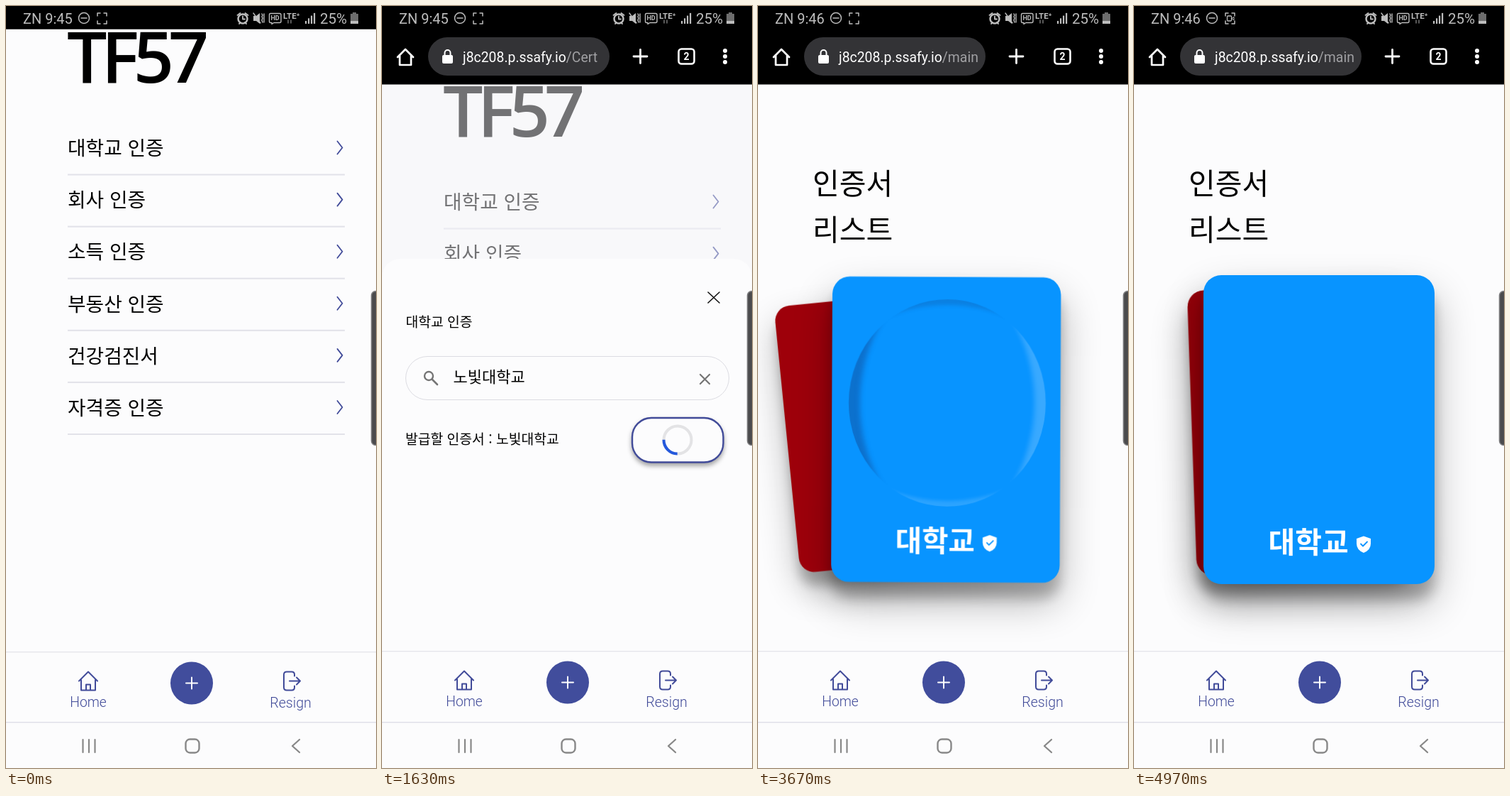
Animation, 522 px wide and 1073 px high, one loop 5000 ms. Source, as an HTML page:

```html
<!DOCTYPE html>
<html lang="ko">
<head>
<meta charset="utf-8">
<style>
html, body { margin: 0; width: 100%; height: 100%; overflow: hidden; background: #fcfcfd; }
#stage { position: absolute; left: 0; top: 0; width: 522px; height: 1073px; overflow: hidden; }
svg.layer { position: absolute; left: 0; top: 0; }
text { font-family: Roboto, "Noto Sans CJK KR", "Noto Sans CJK", sans-serif; white-space: pre; }
.ko { font-family: "Noto Sans CJK KR", "Noto Sans CJK", sans-serif; }
.logo { font: 600 100px "Open Sans", "Noto Sans", sans-serif; font-stretch: 75%; letter-spacing: -8px; }
.line { fill: none; stroke-linecap: round; stroke-linejoin: round; }
#button { filter: drop-shadow(0 4px 3px rgba(0,0,0,.35)); }
#cards { position: absolute; left: 0; top: 110px; width: 522px; height: 798px; overflow: hidden; }
#deck { position: absolute; left: 98px; top: 269px; width: 326px; height: 435px; perspective: 1200px; }
.card { position: absolute; inset: 0; border-radius: 25px; transform-origin: center bottom;
  box-shadow: 0 28px 55px rgba(0,0,0,.3), 0 22px 17px rgba(0,0,0,.22); }
.card svg, .shade { position: absolute; inset: 0; border-radius: 25px; }
.shade { background: #000; }
#ring { position: absolute; left: 24px; top: 32px; width: 281px; height: 295px; border-radius: 50%;
  box-shadow: inset 100px 0 8px -84px rgba(20,60,130,.4), inset -100px 0 8px -84px rgba(255,255,255,.2),
    inset 0 100px 5px -92px rgba(20,70,140,.25), inset 0 -100px 5px -92px rgba(255,255,255,.15); }
</style>
</head>
<body>
<div id="stage">
  <svg class="layer" id="pages" width="522" height="1073"></svg>
  <div id="cards"><div id="deck"></div></div>
  <svg class="layer" id="system" width="522" height="1073"></svg>
</div>
<script>
const $ = id => document.getElementById(id);
const INDIGO = '#414b99', PAPER = '#fcfcfd';
const SCHOOL = '노빛대학교';

// Text is placed by the vertical centre of its capitals or syllables.
const text = (x, cy, size, str, attrs = '') =>
  `<text x="${x}" y="${cy + size * .36}" font-size="${size}" ${attrs}>${str}</text>`;
const ko = (x, cy, size, str, attrs = '') => text(x, cy + size * .025, size, str, 'class="ko" ' + attrs);
const rect = (x, y, w, h, fill, r = 0, attrs = '') =>
  `<rect x="${x}" y="${y}" width="${w}" height="${h}" rx="${r}" fill="${fill}" ${attrs}/>`;
const line = (d, color, width = 2, attrs = '') =>
  `<path class="line" d="${d}" stroke="${color}" stroke-width="${width}" ${attrs}/>`;
const circle = (x, y, r, fill, attrs = '') => `<circle cx="${x}" cy="${y}" r="${r}" fill="${fill}" ${attrs}/>`;
const MID = 'text-anchor="middle" ';

function listPage() {
  const items = ['대학교 인증', '회사 인증', '소득 인증', '부동산 인증', '건강검진서', '자격증 인증'];
  return `<text class="logo" x="86" y="108">TF57</text>` + items.map((label, i) => {
    const y = 199.5 + i * 73.1;
    return ko(87, y, 27.8, label) + line(`M467.5 ${y - 9}l7 9l-7 9`, INDIGO, 1.8) +
      rect(87, y + 37, 391, 2, '#e2e2e9');
  }).join('');
}

function sheet() {
  return rect(0, 356, 522, 900, PAPER, 26) +
    line('M460 403l16 15M476 403l-16 15', '#111', 1.6) +
    ko(33.5, 445, 19.3, '대학교 인증') +
    rect(33.5, 493.5, 456, 61, PAPER, 30.5, 'id="field" stroke="#dcdce2"') +
    circle(66, 521, 6, 'none', 'stroke="#757575" stroke-width="2.4"') + line('M71 526l7 7', '#757575', 2.6) +
    ko(100.5, 522, 22, '', 'id="query"') + rect(0, 533, 0, 1.3, '#111', 0, 'id="underline"') +
    rect(0, 511, 1.6, 24, '#111', 0, 'id="caret"') +
    line('M449 519l13 13M462 519l-13 13', '#757575', 2.2) +
    ko(33, 610, 19.3, '', 'id="chosen"') +
    rect(353, 580, 128.5, 62.5, PAPER, 27, `id="button" stroke="${INDIGO}" stroke-width="2.4"`) +
    ko(417.5, 609, 22, '요청', MID + `id="request" font-weight="700" fill="${INDIGO}"`) +
    `<g id="spinner">${circle(417, 611, 19.5, 'none', 'stroke="#e3e3e5" stroke-width="4"')}
      <path d="M397.5 611A19.5 19.5 0 0 0 417 630.5" fill="none" stroke="#2458dc" stroke-width="4"/></g>` +
    `<g id="done" fill="${INDIGO}">${ko(261, 777, 27.7, '인증서가 발급되었습니다.', MID)}
      ${ko(261, 814, 27.7, '메인에서 확인하세요!', MID)}</g>`;
}

$('pages').innerHTML = rect(0, 0, 522, 1073, PAPER) +
  `<g id="flow"><g id="list">${listPage()}</g>
   ${rect(0, 0, 522, 1073, 'rgba(242,242,247,.47)', 0, 'id="veil"')}
   <g id="sheet">${sheet()}</g></g>
   <g id="main">${ko(77, 249, 41, '인증서')}${ko(77, 314, 41, '리스트')}</g>`;

function keyboard() {
  const ink = '#252525', soft = '#5d5d60', pitch = 50.75;
  const key = (x, y, w, h, label = '', hint = '', fill = '#f9f9fb', size = 25) =>
    rect(x, y, w, h, fill, 6) + ko(x + w / 2, y + h / 2 + (hint ? 5 : 0), size, label, MID + `fill="${ink}"`) +
    ko(x + 30, y + 11, 10, hint, MID + 'fill="#999"');
  const row = (x, y, h, labels, hints = '') =>
    [...labels].map((c, i) => key(x + i * pitch, y, 41, h, c, hints[i])).join('');
  const special = '#cdcdd2';
  return rect(0, 526, 522, 547, '#dcdce1') + rect(0, 526, 522, 65, '#eef1f2') +
    rect(0, 525, 522, 1.5, '#d5d8da') + rect(55, 526, 1.2, 65, '#cbced0') +
    circle(20, 559, 6, 'none', 'stroke="#222" stroke-width="3.5"') + circle(20, 559, 1.8, '#222') +
    line('M27 557h15v4h-3v4h-5v-4h-7', '#222', 2.5) +
    line('M30 619a12 12 0 0 0-5 18M40 641a12 12 0 0 0 5-18M25 637l-4-1M45 623l4 1', soft, 2.5) +
    text(35, 630, 16, 'T', MID + `fill="${soft}" font-weight="700"`) + rect(64, 617, 1.2, 26, '#b9b9be') +
    circle(105, 630, 12.5, soft) + circle(100.5, 626, 1.8, '#eee') + circle(109.5, 626, 1.8, '#eee') +
    `<path d="M98 631h14a7 7 0 0 1-14 0" fill="#eee"/>` +
    `<path d="M175 617h18q4 0 4 4v13l-9 9h-13q-4 0-4-4v-18q0-4 4-4" fill="${soft}"/>` +
    line('M178 630q6 7 12 0M179 624h.1M188 624h.1', '#eee', 2.4) + line('M189 642v-7h7', '#eee', 1.8) +
    rect(250.5, 617, 26, 26, soft, 4) + text(263.5, 630, 11, 'GIF', MID + 'fill="#fff" font-weight="700"') +
    rect(338, 616, 9, 17, soft, 4.5) + line('M333 627a9.5 9.5 0 0 0 19 0M342.5 637v6', soft, 2.5) +
    circle(422, 630, 7.5, 'none', `stroke="${soft}" stroke-width="6"`) +
    circle(422, 630, 10.8, 'none', `stroke="${soft}" stroke-width="4" stroke-dasharray="5.65"`) +
    [476, 484, 492].map(x => circle(x, 630, 2.3, soft)).join('') +
    row(12, 668, 44, '1234567890') + row(12, 724, 57, 'ㅂㅈㄷㄱㅅㅛㅕㅑㅐㅔ', 'ㅃㅉㄸㄲㅆ/‹›ㅒㅖ') +
    row(37.4, 793, 57, 'ㅁㄴㅇㄹㅎㅗㅓㅏㅣ', '!@#%^&*()') +
    key(12, 861, 58, 57, '', '', special) + `<path d="M41 877l12 13h-7v11h-10v-11h-7z" fill="${soft}"/>` +
    row(88, 861, 57, 'ㅋㅌㅊㅍㅠㅜㅡ', '-\'":;,?') +
    key(451, 861, 59, 57, '', '', special) + `<path d="M467 889.5l7-8h20v16h-20z" fill="${soft}"/>` +
    line('M480 886l7 7M487 886l-7 7', '#eee', 2) +
    key(12, 930, 65, 57, '!#1', '', special, 23) + key(88, 930, 41, 57, '-') +
    key(139, 930, 243, 57, '한국어', '', '#f9f9fb', 14) +
    `<path d="M229 953v11l-6-5.5zM293 953v11l6-5.5z" fill="${ink}"/>` +
    key(393, 930, 41, 57) + circle(413.5, 967, 2, ink) +
    rect(444, 930, 66, 57, special, 6) + ko(477, 958, 22, '이동', MID + 'fill="#2f86dd"') +
    [0, 1, 2].map(i => line(`M481 ${1037 + i * 5}h23`, '#777', 2.5, 'stroke-dasharray=".1 4.5"')).join('') +
    line('M486 1051h13', '#777', 2);
}

function appBar() {
  const label = MID + `fill="${INDIGO}" font-weight="300"`;
  return rect(0, 909, 522, 164, PAPER) + rect(0, 908.5, 522, 1.4, '#e5e5eb') +
    line('M103 950l13-13l13 13M106 948v15h20v-15M113 963v-8h6v8', INDIGO, 2) +
    circle(262, 953, 30, '#414d9c') + line('M254 953h16M262 945v16', '#fff', 2) +
    line('M407 943v-2q0-4-4-4h-7q-4 0-4 4v18q0 4 4 4h7q4 0 4-4v-2M400 950h15M410 945l5 5l-5 5', INDIGO, 2) +
    text(116, 980, 19.3, 'Home', label) + text(401.5, 980, 19.6, 'Resign', label);
}

function browserBar() {
  return rect(0, 30, 522, 80.5, '#000') + line('M22 72l11-11l11 11M25 70v13h16v-13', '#fff', 2.7) +
    rect(65, 44, 256, 54, '#333336', 27) + rect(85, 69, 15, 12, '#fff', 2) +
    line('M88.5 69v-3a4 4 0 0 1 8 0v3', '#fff', 2) +
    `<text x="114" y="79" font-size="19.4" fill="#fff">j8c208.p.ssafy.io<tspan id="path" fill="#a0a0a3"></tspan></text>` +
    line('M355 71h19M364.5 61.5v19', '#fff', 2.8) +
    rect(418.5, 60.5, 22, 21, 'none', 4, 'stroke="#fff" stroke-width="2.6"') +
    text(429.5, 71, 14, '2', MID + 'fill="#fff" font-weight="700"') +
    [63, 71, 79].map(y => circle(484, y, 3, '#fff')).join('');
}

function statusBar() {
  const c = '#bdbdbd';
  return rect(0, 0, 522, 32.5, '#000') + text(24, 17.5, 20, '', `id="clock" fill="${c}"`) +
    circle(110, 17, 7.5, 'none', `stroke="${c}" stroke-width="1.5"`) + line('M106 17h8', c, 1.5) +
    line('M129 14v-4h4M138 10h4v4M142 21v4h-4M133 25h-4v-4', c, 1.5) +
    `<g id="rec">${rect(131.5, 14, 6, 7, 'none', 1, `stroke="${c}" stroke-width="1.3"`)}${line('M138 17.5l3-2v4z', c, 1)}</g>` +
    circle(334, 18, 6.5, 'none', `stroke="${c}" stroke-width="2.5"`) +
    line('M334 14.5v4h3M326.5 13l4-3M341.5 13l-4-3M329 25l2-2M339 25l-2-2', c, 1.8) +
    `<path d="M349 14h4l5-4v15l-5-4h-4z" fill="${c}"/>` +
    line('M349 10l10 14M361 11l1 2l-1 2l1 2l-1 3l1 3M364 11v12', c, 1.4) +
    line('M373 10.5h13q2 0 2 2v9q0 2-2 2h-8l-3 2v-2h-2q-1.5 0-1.5-2v-9q0-2 1.5-2', c, 1.4) +
    text(379.5, 17, 9, 'HD', MID + `fill="${c}" font-weight="700"`) +
    text(391, 13.5, 11.5, 'LTE⁺', `fill="${c}" font-weight="700"`) + line('M398 20v4M402 20v4', '#777', 1.5) +
    [0, 1, 2, 3].map(i => rect(422 + i * 4, 21 - i * 3.7, 2.2, 4 + i * 3.7, c)).join('') +
    text(443, 17.5, 20.5, '25%', `fill="${c}"`) +
    `<path d="M486 11h3v-2h5v2h3v14h-11z" fill="#6d6d6d"/>` + rect(486, 21, 11, 4, c);
}

$('system').innerHTML =
  `<g id="appBar">${appBar()}</g>` + rect(0, 1008, 522, 1.4, '#dedee8') +
  `<g id="keyboard">${keyboard()}</g>` +
  line('M108.5 1033v18M117 1033v18M125.5 1033v18', '#888', 2.2) +
  rect(253.5, 1032.5, 19, 19, 'none', 6, 'stroke="#888" stroke-width="2.4"') +
  line('M414 1033l-10 9l10 9', '#888', 2.3, 'id="back"') + line('M400 1038l9 9l9-9', '#888', 2.3, 'id="hide"') +
  `<g id="browser">${browserBar()}</g>` + statusBar() +
  rect(515.5, 401.5, 20, 217, '#4b4b4d', 6, 'stroke="#858587" stroke-width="1.5"');

const makeCard = (label, color) => {
  const el = document.createElement('div');
  el.className = 'card';
  el.style.background = color;
  el.innerHTML = `<svg width="326" height="435">${ko(91.5, 375, 41, label, 'font-weight="700" fill="#fff"')}
    <path d="M226 367.5l10 3.5v7q0 9-10 13q-10-4-10-13v-7z" fill="#fff"/>
    ${line('M222 378.5l3 3l6-6', color, 1.8)}</svg><div class="shade"></div>`;
  $('deck').append(el);
  return el;
};
const cards = [makeCard('신분증', '#bc000c'), makeCard('대학교', '#0894ff')];
cards[1].insertAdjacentHTML('beforeend', '<div id="ring"></div>');

const clamp = v => Math.min(1, Math.max(0, v));
const mix = (a, b, k) => a + (b - a) * k;
const easeOut = u => 1 - (1 - clamp(u)) ** 2.3;
const ramp = (t, from, to) => easeOut((t - from) / (to - from));
const show = (id, on) => { $(id).style.display = on ? '' : 'none'; };
const shift = (id, y) => $(id).setAttribute('transform', `translate(0 ${y})`);

// Each swipe: finger direction and its drag as [ms, deck progress]; the last point is the release.
const SWIPES = [
  { dir: 1, drag: [[3300, 0], [3590, .52]] },
  { dir: -1, drag: [[3860, 1], [3990, .45]] },
  { dir: 1, drag: [[4150, 0], [4240, .36], [4400, .6], [4560, .32], [4715, .52]] }
];
const SETTLE = 190;

function along(points, t) {
  const i = points.findIndex(p => p[0] > t);
  if (i < 0) return points.at(-1)[1];
  const [[t0, a], [t1, b]] = [points[i - 1], points[i]];
  return mix(a, b, (t - t0) / (t1 - t0));
}

// Stacked-deck pose: [x %, y %, z px, degrees, scale, shade].
function pose(index, progress, dir) {
  const p = progress - index, d = Math.abs(p);
  const swings = p * dir > 0 && d < 1;
  const s = swings ? Math.sqrt(1 - Math.abs(d - .5) / .5) : 0;
  return [-(8 - d * .75 + 96 * s) * p, -25 * s * d, -100 * d, -2 * p - 28 * p * s,
    1 - .5 * s * d, clamp((d - .5) / .5) * .22];
}

function renderCards(t) {
  const swipe = SWIPES.findLast(s => t >= s.drag[0][0]) || { dir: 0, drag: [[0, 0]] };
  const [release, last] = swipe.drag.at(-1);
  const dragging = swipe.dir && t < release;
  const now = dragging ? along(swipe.drag, t) : last;
  const rest = swipe.dir > 0 ? 1 : 0;
  cards.forEach((card, i) => {
    let v = pose(i, now, swipe.dir);
    if (!dragging) {
      const end = pose(i, rest, 0), k = easeOut((t - release) / SETTLE);
      v = v.map((a, n) => mix(a, end[n], k));
    }
    const [x, y, z, angle, scale, shade] = v;
    card.style.transform = `translate3d(${x}%,${y}%,${z}px) rotate(${angle}deg) scale(${scale})`;
    card.style.zIndex = 2 - Math.abs(Math.round((dragging ? now : rest) - i));
    card.querySelector('.shade').style.opacity = shade;
  });
  $('ring').style.opacity = ramp(t, 3560, 3640) * (1 - ramp(t, 3720, 3820));
}

const TYPING = [[500, 'ㄴ'], [540, '노'], [590, '놉'], [630, '노비'], [670, '노빛'], [780, '노빛ㄷ'],
  [820, '노빛대'], [880, '노빛댛'], [920, '노빛대하'], [960, '노빛대학'], [1020, '노빛대학ㄱ'], [1060, SCHOOL]];

function render(t) {
  const onMain = t >= 2980;
  const bar = ramp(t, 330, 430), keys = ramp(t, 340, 440) - ramp(t, 1130, 1230), up = ramp(t, 60, 180);
  const focused = t >= 340 && t < 1130, waiting = t >= 1500 && t < 2600;

  show('flow', !onMain);
  show('main', onMain);
  show('cards', onMain);
  shift('list', 76 * bar - 206 * keys);
  $('veil').style.opacity = up;
  shift('sheet', 560 * (1 - up) - 206 * keys);

  const typed = (TYPING.findLast(s => t >= s[0]) || [0, ''])[1];
  const width = typed.length * 22 * .92;
  $('query').textContent = typed;
  $('underline').setAttribute('x', 101);
  $('underline').setAttribute('width', focused ? width : 0);
  $('caret').setAttribute('x', 101 + width);
  show('caret', focused);
  $('field').style.filter = focused ? 'drop-shadow(0 2px 3px rgba(0,0,0,.2))' : '';
  $('chosen').textContent = '발급할 인증서 : ' + (t >= 1130 ? SCHOOL : '');
  show('request', !waiting);
  show('spinner', waiting);
  $('spinner').setAttribute('transform', `rotate(${(t - 1630) / 400 * 360} 417 611)`);
  show('done', t >= 2600);

  shift('keyboard', 547 * (1 - keys));
  show('keyboard', keys > 0);
  show('back', keys < .5);
  show('hide', keys >= .5);
  shift('browser', 78 * (bar - 1));
  shift('appBar', .5 - bar);
  $('path').textContent = onMain ? '/main' : '/Cert';
  $('clock').textContent = onMain ? 'ZN 9:46' : 'ZN 9:45';
  const blink = t % 360;
  show('rec', blink >= 195 && blink < 358);
  if (onMain) renderCards(t);
}

const start = performance.now();
function tick() {
  render((performance.now() - start) % 5000);
  requestAnimationFrame(tick);
}
tick();
</script>
</body>
</html>
```
